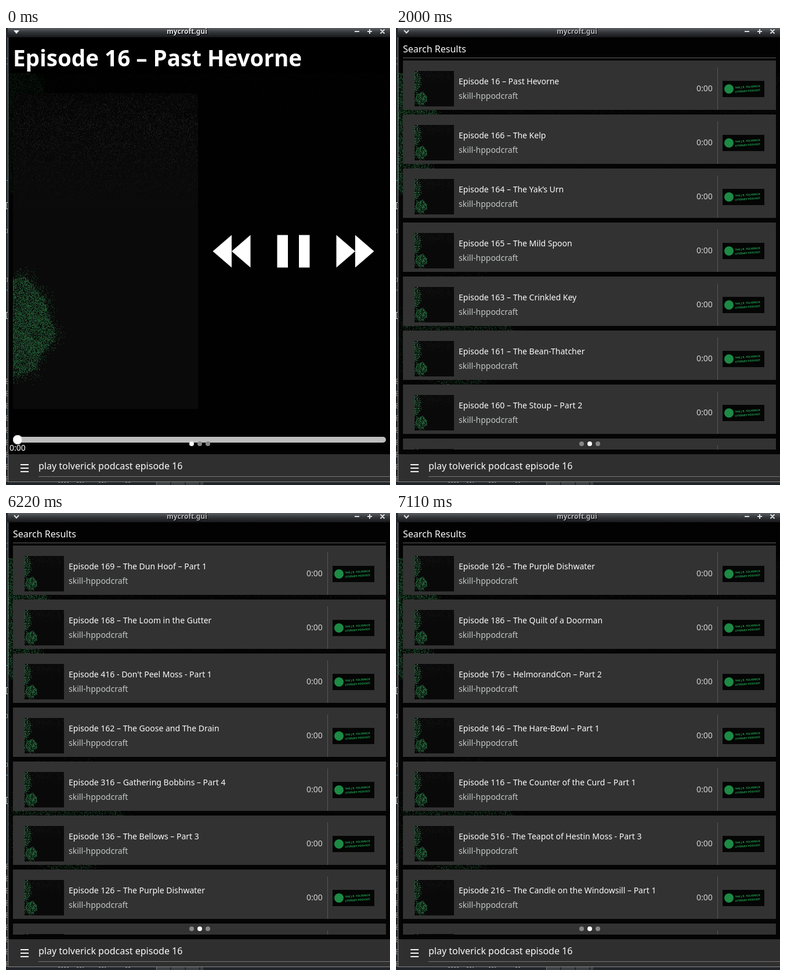
Recreate the animation shown at these times as an HTML page with a canvas. Size 662 px wide and 787 px high, loop 8 s.

```html
<!DOCTYPE html>
<html lang="en">
<head>
<meta charset="utf-8">
<title>mycroft.gui</title>
<style>
html, body { margin: 0; width: 100%; height: 100%; overflow: hidden; background: #000; }
body { font: 14px/19px "Noto Sans", sans-serif; color: #fcfcfc; }
div, canvas, svg { position: absolute; white-space: nowrap; }
#stage { left: 0; top: 0; width: 662px; height: 787px; overflow: hidden; background: #22262a; }
#bar { left: 3px; top: 0; width: 659px; height: 16px; background: linear-gradient(#5c5f63, #34373a 45%, #15171a); }
#name { left: 277px; top: -2px; font: bold 12px/16px "Noto Sans", sans-serif; text-shadow: 1px 1px #000; }
#view { left: 4px; top: 16px; width: 658px; height: 718px; overflow: hidden; background: #000; }
#pages { left: -4px; top: -16px; width: 1400px; height: 787px; }
.page { left: 0; top: 0; width: 662px; height: 787px; }
#list { left: 659px; }
#title { left: 12px; top: 24px; font: bold 38.6px/54px "Noto Sans", sans-serif; color: #fff; }
#track { left: 12px; top: 704px; width: 643px; height: 10px; border-radius: 5px; background: #bdbdbd; }
#knob { left: 12px; top: 701px; width: 16px; height: 16px; border-radius: 50%; background: #fcfcfc; box-shadow: inset 0 0 0 1px #cfcfcf; }
#head { left: 12px; top: 25px; font-size: 16px; line-height: 22px; }
#rule { left: 12px; top: 51px; width: 643px; height: 1px; background: #606060; }
#clip { left: 12px; top: 56px; width: 643px; height: 670px; overflow: hidden; }
#rows { left: 0; top: 0; width: 643px; }
.row { left: 0; width: 643px; height: 85px; background: #323232; }
.row canvas { left: 20px; top: 18px; }
.name { left: 96px; top: 26px; }
.skill { left: 96px; top: 51px; color: #c3c6c7; }
.time { left: 506px; top: 38px; color: #d2d3d4; }
.sep { left: 542px; top: 12px; width: 1px; height: 73px; background: #585858; }
.logo { left: 551px; top: 35px; width: 72px; height: 28px; overflow: hidden; background: #040504; color: #21a352; }
.logo i { position: absolute; left: 3px; top: 6px; width: 16px; height: 16px; border-radius: 50%; background: #1d8a45; }
.logo div { left: 21px; top: 7px; font: bold 4.6px/7px "Open Sans", sans-serif; text-align: right; transform: rotate(-4deg); }
.dot { top: 712px; width: 8px; height: 8px; border-radius: 50%; }
#foot { left: 4px; top: 734px; width: 658px; height: 47px; background: #2f2f2f; }
#say { left: 52px; top: 9px; font-size: 16px; line-height: 22px; }
#line { left: 52px; top: 38px; width: 606px; height: 1px; background: #777; }
</style>
</head>
<body>
<div id="stage">
  <svg width="662" height="787" fill="none">
    <path d="M3.5 0V781.5H662" stroke="#85888a"/>
    <path d="M0 52H3M0 62H3" stroke="#4a6a86"/>
    <path d="M0 262.500H3M0 451.500H3" stroke="#4f87b0"/>
    <path d="M3 300.500H.5V311.500H3M3 489.500H.5V500.500H3" stroke="#c9cbcc"/>
    <path d="M0 346.500H2.500V352.500H0M0 430.500H2.500V436.500H0" stroke="#777a7c"/>
    <path id="marks" stroke="#8a8380"/>
    <path d="M90 782.500H108M122 782.500H134M160 782.500H172M206 782.500H214" stroke="#8b8e90" stroke-dasharray="3 2"/>
    <path d="M260 784.500H340" stroke="#3d4144" stroke-width="5" stroke-dasharray="23 2"/>
    <path d="M259.500 782V787" stroke="#777a7c"/>
  </svg>
  <div id="bar"></div>
  <div id="name">mycroft.gui</div>
  <svg width="662" height="16" fill="none" stroke="#dcdedf" stroke-width="2">
    <path id="full" d="M13 4H23L18 10Z" fill="#f4f5f5" stroke="none"/>
    <path id="vee" d="M14 4L18 8.500L22 4"/>
    <path d="M601 6H609M623 6H631M627 2V10M645.500 2.500L652.500 9.500M652.500 2.500L645.500 9.500"/>
  </svg>
  <div id="view">
    <canvas id="back" width="658" height="718"></canvas>
    <div id="pages">
      <div class="page">
        <div id="title">Episode 16 – Past Hevorne</div>
        <canvas id="cover" width="319" height="544" style="left:12px;top:112px"></canvas>
        <svg width="662" height="787" fill="#fff">
          <path d="M356.500 384.500L389 356.500V412.500ZM389 384.500L421.500 356.500V412.500ZM467.500 356.500H486V412.500H467.500ZM505 356.500H523.500V412.500H505ZM569.500 356.500L602 384.500L569.500 412.500ZM602 356.500L634.500 384.500L602 412.500Z"/>
        </svg>
        <div id="track"></div>
        <div id="knob"></div>
        <div style="left:6px;top:713px">0:00</div>
      </div>
      <div class="page" id="list">
        <div id="head">Search Results</div>
        <div id="rule"></div>
        <div id="clip"><div id="rows"></div></div>
      </div>
    </div>
  </div>
  <div class="dot" style="left:316px"></div>
  <div class="dot" style="left:330px"></div>
  <div class="dot" style="left:344px"></div>
  <div id="foot">
    <svg width="50" height="47"><path d="M21 18H35M21 24H35M21 30H35" stroke="#f4f4f4" stroke-width="2"/></svg>
    <div id="say">play tolverick podcast episode 16</div>
    <div id="line"></div>
  </div>
</div>
<script>
const LOOP = 8000, PITCH = 93;
const $ = id => document.getElementById(id);

const episodes = [
  '16 – Past Hevorne', '166 – The Kelp', '164 – The Yak’s Urn', '165 – The Mild Spoon',
  '163 – The Crinkled Key', '161 – The Bean-Thatcher', '160 – The Stoup – Part 2',
  '167 – The Sprouting Spool', '169 – The Dun Hoof – Part 1', '168 – The Loom in the Gutter',
  "416 - Don't Peel Moss - Part 1", '162 – The Goose and The Drain',
  '316 – Gathering Bobbins – Part 4', '136 – The Bellows – Part 3', '126 – The Purple Dishwater',
  '186 – The Quilt of a Doorman', '176 – HelmorandCon – Part 2', '146 – The Hare-Bowl – Part 1',
  '116 – The Counter of the Curd – Part 1', '516 - The Teapot of Hestin Moss - Part 3',
  '216 – The Candle on the Windowsill – Part 1', '156 – The Tin Orchard'
];

// [start, value]: each value holds until the next start
const pageSteps = [[0, 0], [1890, -24], [2000, -659]];
const scrollSteps = [
  [0, 0], [5330, 112], [5560, 190], [5780, 330], [5890, 478], [6000, 598], [6110, 690],
  [6220, 744], [6330, 778], [6450, 872], [6560, 988],
  [6670, 1103], [6780, 1192], [6890, 1254], [7000, 1290], [7110, 1302]
];
const at = (steps, t) => steps.reduce((v, [start, value]) => t >= start ? value : v, 0);

function random(seed) {
  return () => {
    seed = (seed * 1664525 + 1013904223) >>> 0;
    return seed / 4294967296;
  };
}

// Faint grey grain, strongest a third of the way down
function grain(g, seed, count, w, h, strength) {
  const r = random(seed);
  for (let i = 0; i < count; i++) {
    const x = r() * w | 0, v = r();
    const fade = Math.min(1, .5 + v * 2) * (1 - v);
    g.fillStyle = `rgba(190,190,190,${strength * r() * fade})`;
    g.fillRect(x, v * h | 0, 1, 1 + r() * 2 | 0);
  }
}

// Cloud of green specks, dense inside and loose at the rim
function cloud(g, seed, count, cx, cy, rx, ry, alpha) {
  const r = random(seed);
  for (let i = 0; i < count; i++) {
    const a = r() * Math.PI * 2;
    const rim = 1 + .06 * Math.sin(a * 5 + 1) + .05 * Math.sin(a * 8);
    const d = Math.sqrt(r()) * rim * (1 + .3 * Math.pow(r(), 6));
    g.fillStyle = `rgba(${26 + r() * 20 | 0},${72 + r() * 50 | 0},${44 + r() * 24 | 0},${alpha})`;
    g.fillRect(cx + Math.cos(a) * d * rx | 0, cy + Math.sin(a) * d * ry | 0, 1, 1);
  }
}

function paintBack() {
  const g = $('back').getContext('2d');
  g.fillStyle = '#040404';
  g.fillRect(0, 0, 658, 718);
  grain(g, 5, 22000, 658, 320, .1);
  cloud(g, 8, 14000, 14, 152, 56, 112, .6);
  cloud(g, 9, 11000, 100, 510, 95, 90, .45);
  g.fillStyle = '#020202';
  g.fillRect(0, 0, 658, 62);
}

function paintCover() {
  const g = $('cover').getContext('2d');
  g.fillStyle = '#0a0a0a';
  g.fillRect(0, 0, 319, 544);
  const shade = g.createLinearGradient(0, 0, 0, 200);
  shade.addColorStop(0, 'rgba(0,0,0,.6)');
  shade.addColorStop(1, 'rgba(0,0,0,0)');
  g.fillStyle = shade;
  g.fillRect(0, 0, 319, 200);
  grain(g, 21, 26000, 319, 215, .13);
  cloud(g, 34, 16000, 0, 403, 67, 82, .7);
}

function paintThumb(canvas) {
  canvas.width = 68;
  canvas.height = 61;
  const g = canvas.getContext('2d');
  g.fillStyle = '#090909';
  g.fillRect(0, 0, 68, 61);
  grain(g, 3, 400, 68, 26, .1);
  cloud(g, 4, 330, 2, 18, 9, 18, .9);
  cloud(g, 6, 360, 11, 48, 10, 11, .9);
}

function addRow(text, i) {
  const row = document.createElement('div');
  row.className = 'row';
  row.style.top = i * PITCH + 'px';
  row.innerHTML = `<canvas></canvas><div class="name">Episode ${text}</div>
    <div class="skill">skill-hppodcraft</div><div class="time">0:00</div><div class="sep"></div>
    <div class="logo"><i></i><div>THE J.R. TOLVERICK<br>LITERARY PODCAST</div></div>`;
  paintThumb(row.firstChild);
  $('rows').append(row);
}

function markPath() {
  let d = '';
  for (let y = 604; y < 780; y += 21) d += `M3 ${y}.500H.5V${y + 8}.500H3M0 ${y + 4}.500H3`;
  $('marks').setAttribute('d', d);
}

const dots = document.querySelectorAll('.dot');

function draw(t) {
  const active = t < 1890 ? 0 : 1;
  const focused = t < 670;
  $('full').style.display = focused ? '' : 'none';
  $('vee').style.display = focused ? 'none' : '';
  $('name').style.color = focused ? '#e2e4e6' : '#b4b7ba';
  $('back').style.opacity = active ? 1 : .3;
  $('pages').style.transform = `translateX(${at(pageSteps, t)}px)`;
  $('rows').style.transform = `translateY(${-at(scrollSteps, t)}px)`;
  dots.forEach((dot, i) => dot.style.background = i === active ? '#fcfcfc' : '#858687');
}

paintBack();
paintCover();
markPath();
episodes.forEach(addRow);

const start = performance.now();
function tick() {
  draw((performance.now() - start) % LOOP);
  requestAnimationFrame(tick);
}
tick();
</script>
</body>
</html>
```
